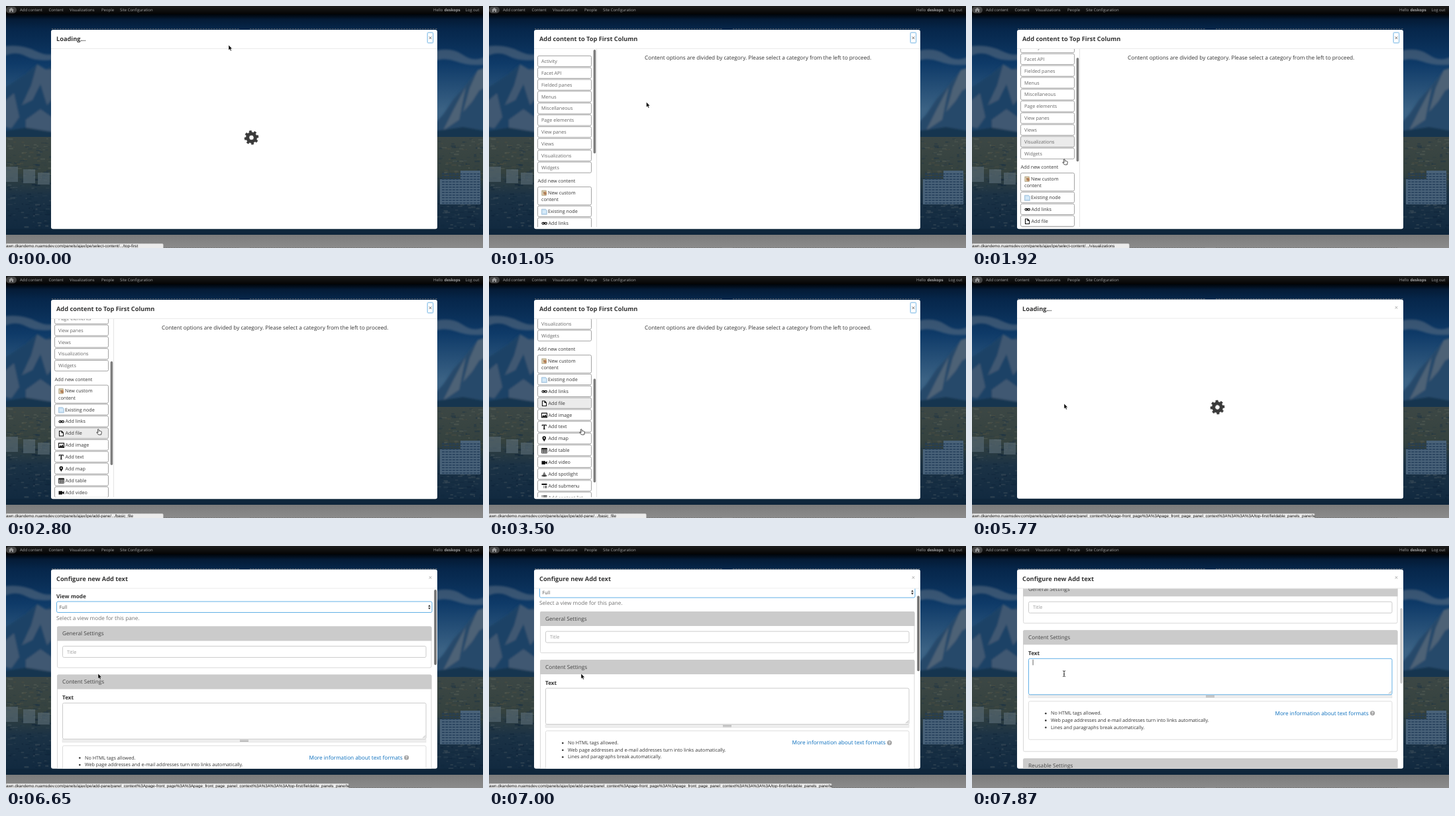
These frames come from a looping animation (720x366 px, 8000 ms). An HTML page:

```html
<!DOCTYPE html>
<html lang="en">
<head>
<meta charset="utf-8">
<title>Adding a text pane</title>
<style>
html, body { margin: 0; width: 100%; height: 100%; overflow: hidden; background: #000; }
#stage { display: block; width: 720px; height: 366px; }
text { font-family: "Open Sans", sans-serif; text-rendering: geometricPrecision; white-space: pre; }
.ui { font-family: "Liberation Sans", Arial, sans-serif; }
</style>
</head>
<body>
<svg id="stage" viewBox="0 0 720 366"></svg>
<script>
const STEP = 175, LOOP = 8000;
const SMALL = 7.19, BODY = 8.215, HEAD = 9.24;
const stage = document.getElementById('stage');
const $ = id => document.getElementById(id);

const text = (x, mid, size, str, fill = '#333', more = '') =>
  `<text x="${x}" y="${mid + size * .36}" font-size="${size}" fill="${fill}" ${more}>${str}</text>`;
const rect = (x, y, w, h, fill, more = '') =>
  `<rect x="${x}" y="${y}" width="${w}" height="${h}" fill="${fill}" ${more}/>`;
const path = (d, fill, more = '') => `<path d="${d}" fill="${fill}" ${more}/>`;
const fade = (id, ...stops) => `<linearGradient id="${id}" x2="0" y2="1">` +
  stops.map(([o, c]) => `<stop offset="${o}" stop-color="${c}"/>`).join('') + '</linearGradient>';
const bold = 'font-weight="700"';

// Backdrop: sky, hills and a speckled city
let seed = 7;
const rnd = () => (seed = seed * 16807 % 2147483647) / 2147483647;
function specks(x0, x1, y0, y1, n, tones) {
  let out = '';
  for (let i = 0; i < n; i++)
    out += rect((x0 + rnd() * (x1 - x0)).toFixed(1), (y0 + rnd() * (y1 - y0)).toFixed(1), (2 + rnd() * 6).toFixed(1),
      (.8 + rnd() * 1.8).toFixed(1), tones[Math.floor(rnd() * tones.length)], 'opacity=".5"');
  return out;
}
function backdrop() {
  const far = ['#596058', '#2c3d45', '#4c4f42', '#1f3444'], near = ['#0c2136', '#2c4353', '#10283c', '#42535c'];
  let windows = '';
  for (let y = 254; y < 300; y += 4) windows += `M658 ${y}H717`;
  return rect(0, 0, 720, 347, 'url(#sky)') +
    '<g filter="url(#soft)">' +
    path('M-9 62Q20 56 45 68T80 66V80Q50 86 30 76T-9 80ZM640 70Q670 60 690 74T730 72V88Q700 92 680 84T640 86Z', '#6f7d8a', 'opacity=".45"') +
    path('M-9 128L10 116 28 104 47 88 60 96 80 84V210H-9Z', '#1f4266') +
    path('M47 88L38 120 24 150 40 142 52 118 62 150 80 128V96L60 96ZM-9 150L12 132 20 168 8 185-9 180ZM30 172L52 156 80 176V194L30 190Z', '#57697a', 'opacity=".6"') +
    path('M640 186L660 164 676 140 694 120 712 97 730 90V210H640Z', '#284a6b') +
    path('M712 97L700 124 690 160 704 144 714 128 730 120V92ZM694 122L676 156 660 188 684 172Z', '#66737e', 'opacity=".6"') +
    path('M-9 190L30 184 80 192V206H-9ZM640 190L690 183 730 190V206H640Z', '#18344f') + '</g>' +
    rect(0, 198, 720, 148, 'url(#town)') +
    specks(0, 66, 200, 262, 110, far) + specks(0, 66, 255, 336, 110, near) +
    specks(651, 718, 200, 262, 110, far) + specks(651, 718, 290, 336, 80, near) +
    path('M0 243H18V266H0ZM26 247H44V268H26ZM48 252H66V270H48Z', '#5b6d78', 'opacity=".6"') +
    path('M655 262H686V249H716V300H655Z', '#496279') +
    path(windows, 'none', 'stroke="#233e59" stroke-width="1.7" stroke-dasharray="4 1.3"') +
    rect(0, 337, 720, 9, '#0f263b') + rect(0, 346, 720, 20, 'url(#band)') +
    path('M69 34.5H352M368 34.5H651M77 365.5H352M368 365.5H642', 'none',
      'stroke="#777" stroke-width=".8" stroke-dasharray="2.5 1.5"');
}
function topBar() {
  const menu = [[21, 'Add content'], [64.5, 'Content'], [96, 'Visualizations'], [144, 'People'], [172, 'Site Configuration'], [645, 'Hello']];
  return rect(0, 0, 720, 20, 'url(#shade)') + rect(0, 0, 720, 12, 'url(#bar)') +
    rect(0, 1, 16, 10, '#444', 'rx="5"') +
    path('M8 2.5L12 6H11V9H9V7H7V9H5V6H4Z', '#999') +
    menu.map(([x, s]) => text(x, 6.3, 5.95, s, '#a2a2a2')).join('') +
    text(661.5, 6.3, 5.95, 'deskops', '#a2a2a2', bold) + text(693.5, 6.3, 5.95, 'Log out', '#a2a2a2');
}

// Pane list
const cats = ['Activity', 'Facet API', 'Fielded panes', 'Menus', 'Miscellaneous', 'Page elements', 'View panes', 'Views', 'Visualizations', 'Widgets'];
const adds = ['Existing node', 'Add links', 'Add file', 'Add image', 'Add text', 'Add map', 'Add table', 'Add video', 'Add spotlight', 'Add submenu', 'Add content list', 'Add content item'];
const line = 'stroke="#111" stroke-width="1.1"';
const icons = [
  path('M.5 .5H6.5L8.3 2.5V8.5H.5Z', '#c3dff4', 'stroke="#86abc9" stroke-width=".6"') + path('M2 3.5H7M2 5.5H7', 'none', 'stroke="#e9f4fb"'),
  path('M1 4a1.3 1.3 0 0 1 1.3-1.3h1a1.3 1.3 0 0 1 0 2.8h-1A1.3 1.3 0 0 1 1 4ZM5 4a1.3 1.3 0 0 1 1.3-1.3h.8a1.3 1.3 0 0 1 0 2.8h-.8A1.3 1.3 0 0 1 5 4ZM3 4H6', 'none', line),
  path('M1.5 .5H5L7.5 3V8H1.5ZM5 .5V3H7.5', '#fff', line),
  path('M.5 1H8.5V7.5H.5Z', '#fff', line) + path('M1 7L3 4 4.5 5.5 6.5 3 8 7Z', '#111'),
  path('M.8 .5H7.8V2.7H7L6.5 1.6H5.1V6.8L6.2 7.7H2.4L3.5 6.8V1.6H2.1L1.6 2.7H.8Z', '#111'),
  path('M4.3 8.5C3 6 1.5 4.5 1.5 3A2.8 2.8 0 0 1 7.1 3C7.1 4.5 5.6 6 4.3 8.5ZM4.3 2a1 1 0 1 0 .1 0Z', '#111', 'fill-rule="evenodd"'),
  path('M.6 .8H8.4V8H.6ZM.6 3.6H8.4M.6 5.8H8.4M3.2 2V8M5.8 2V8', '#fff', 'stroke="#111" stroke-width=".8"') + rect(.4, .5, 8.2, 1.8, '#111'),
  path('M.5 2H6V4L8.7 2.2V7L6 5.2V7.2H.5Z', '#111'),
  path('M4.4 .5L7 5.5H1.8Z', '#777') + path('M.5 6Q4.5 4.6 8.3 6V7.2Q4.5 8.4 .5 7.2Z', '#333'),
  path('M.5 .5H8.5V2.5H.5ZM3 4H4V5H3ZM5 4H8.5V5H5ZM3 6H4V7H3ZM5 6H8.5V7H5Z', '#111'),
  path('M.5 .7h1.2v1.2H.5ZM2.6 .7h6v1.2h-6ZM.5 2.8h1.2V4H.5ZM2.6 2.8h6V4h-6ZM.5 4.9h1.2v1.2H.5ZM2.6 4.9h6v1.2h-6ZM.5 7h1.2v1.2H.5ZM2.6 7h6v1.2h-6Z', '#111'),
  path('M.7 .8H8.3V7.8H.7Z', '#777', line) + path('M1 2.2H8M2 4.2H7M2 6H7', 'none', 'stroke="#111" stroke-width=".8"')
];
const PITCH = 17.85;
const button = (mid, h, id) => rect(73.5, mid - h / 2, 81, h, '#fff', `id="${id}" rx="2" stroke="#989898" stroke-width=".9"`);
function list() {
  let out = cats.map((s, i) => {
    const y = 83.5 + PITCH * i;
    return button(y, 16.2, s) + text(79, y, SMALL, s, '#666');
  }).join('');
  out += text(73.5, 264.5, SMALL, 'Add new content') + button(287.2, 27.2, 'custom') +
    path('M79.8 279h6.5v7.4h-6.5Z', '#e0d3b4', 'stroke="#94835f" stroke-width=".6"') +
    '<circle cx="84.6" cy="283.3" r="2.5" fill="#c58a5c"/>' + path('M81.5 281L86.5 285', 'none', 'stroke="#6b6b6b" stroke-width=".8"') +
    text(89, 282, SMALL, 'New custom') + text(79, 292.5, SMALL, 'content');
  return out + adds.map((s, i) => {
    const y = 310.5 + PITCH * i;
    return button(y, 16.2, s) + `<g transform="translate(79 ${y - 3.7})">${icons[i]}</g>` + text(i ? 89.5 : 89, y, SMALL, s);
  }).join('');
}

// Settings form
function fieldset(y, h, name) {
  return rect(77.5, y, 564.5, h, '#fff', 'rx="2" stroke="#d8d8d8"') +
    path(`M77 ${y + 21.5}V${y + 1.5}Q77 ${y - .5} 79 ${y - .5}H640.5Q642.5 ${y - .5} 642.5 ${y + 1.5}V${y + 21.5}Z`, '#cbcbcb') +
    text(85, y + 10.5, BODY, name, '#444');
}
function form() {
  const rules = ['No HTML tags allowed.', 'Web page addresses and e-mail addresses turn into links automatically.', 'Lines and paragraphs break automatically.'];
  return text(76, 76.2, BODY, 'View mode', '#333', bold) +
    rect(76.5, 84.5, 566.5, 16.5, '#fff', 'id="select" rx="2"') + text(80.5, 93, SMALL, 'Full', '#555') +
    path('M637.2 92.2L639 89.3 640.8 92.2ZM637.2 93.7L639 96.6 640.8 93.7Z', '#333') +
    text(76, 109.3, BODY, 'Select a view mode for this pane.', '#737373') +
    fieldset(122.5, 62, 'General Settings') +
    rect(85.5, 152, 548.5, 17, '#fff', 'rx="2" stroke="#ccc"') + text(92, 160.5, SMALL, 'Title', '#999') +
    fieldset(195.5, 183, 'Content Settings') + text(85, 230, BODY, 'Text', '#333', bold) +
    rect(85, 293, 549, 4.5, '#eee', 'stroke="#ddd" stroke-width=".5"') +
    path('M353 294.3H366M353 296H366', 'none', 'stroke="#999" stroke-width=".8"') +
    rect(85.5, 238, 548.5, 54.5, '#fff', 'id="area" rx="2"') +
    path('M629 291L633 287M631 291L633 289', 'none', 'stroke="#888" stroke-width=".6"') +
    rect(91.7, 239.5, .7, 8.5, '#222', 'id="caret"') +
    rect(85.5, 302.5, 548.5, 58, '#fff', 'rx="2" stroke="#ddd"') +
    rules.map((s, i) => `<circle cx="111.3" cy="${321 + i * 10.6}" r="1.3" fill="#333"/>` + text(119, 320.6 + i * 10.6, SMALL, s)).join('') +
    text(457.5, 320.4, BODY, 'More information about text formats', '#0a6ebd') +
    '<circle cx="604.5" cy="320.5" r="3.6" fill="#a5a5a5"/>' + text(602.9, 320.6, 6, '?', '#fff', bold) +
    fieldset(389.5, 60, 'Reusable Settings');
}

function gear() {
  const teeth = [[-13, 8.2], [-9, 10.6], [9, 10.6], [13, 8.2]];
  let d = '';
  for (let turn = 0; turn < 360; turn += 45)
    for (const [deg, r] of teeth) {
      const a = (turn + deg) * Math.PI / 180;
      d += `${d ? 'L' : 'M'}${(r * Math.cos(a)).toFixed(2)} ${(r * Math.sin(a)).toFixed(2)}`;
    }
  return path(d + 'ZM3.5 0A3.5 3.5 0 1 0 -3.5 0A3.5 3.5 0 1 0 3.5 0Z', '#3a3a3a',
    'id="gear" fill-rule="evenodd" stroke="#3a3a3a" stroke-width=".5" stroke-linejoin="round"');
}
const ink = 'stroke="#000" stroke-width=".7" stroke-linejoin="round"';
const cursors =
  path('M0 0V7.8L1.8 6.2 3 9 4.4 8.4 3.2 5.7H5.5Z', '#000', 'id="arrow" stroke="#fff" stroke-width=".5"') +
  path('M-.6 .6Q.3-.5 1 .6L1.6 3 Q2.6 2.3 3 3.2Q4 2.6 4.3 3.6Q5.5 3.4 5.3 4.8L4.6 8.5H.6L-2 5.4Q-2.2 4.2-1 4.5L.1 5.3Z', '#fff', 'id="hand" ' + ink) +
  path('M-2-4.2Q0-4.2 0-3Q0-4.2 2-4.2M0-3V3.3M-1 .8H1M-2 4.4Q0 4.4 0 3.3Q0 4.4 2 4.4', 'none', 'id="beam" stroke="#222" stroke-width=".9"');

stage.innerHTML = '<defs>' +
  fade('sky', [0, '#020c1a'], [.1, '#06264a'], [.25, '#0e3a68'], [.45, '#3b6284']) +
  fade('town', [0, '#3c4745'], [.35, '#35423f'], [.6, '#1b3245'], [1, '#10283f']) +
  fade('band', [0, '#7c7c7c'], [1, '#8b8b8b']) + fade('bar', [0, '#1d1d1d'], [1, '#050505']) +
  '<linearGradient id="shade" x2="0" y2="1"><stop offset=".5"/><stop offset="1" stop-opacity="0"/></linearGradient>' +
  '<filter id="soft"><feGaussianBlur stdDeviation="1.6"/></filter>' +
  '<clipPath id="listClip"><rect x="68" y="65" width="100" height="269.5"/></clipPath>' +
  '<clipPath id="formClip"><rect x="68" y="65" width="583" height="272"/></clipPath></defs>' +
  backdrop() + topBar() +
  '<g id="modal">' + rect(68, 36, 583, 301.3, '#fff', 'rx="3"') +
  text(76, 50.1, HEAD, '', '#333', 'id="title" ' + bold) +
  path('M68 64.5H651', 'none', 'stroke="#e5e5e5" stroke-width=".8"') +
  '<g id="ring">' + rect(636, 40, 8.8, 16, '#fff', 'rx="2" stroke="#cfe6f7" stroke-width="2"') +
  rect(636.4, 40.4, 8, 15.2, '#fff', 'rx="1.5" stroke="#86bfe6" stroke-width=".8"') + '</g>' +
  path('M638.8 46.4L642.2 50M642.2 46.4L638.8 50', 'none', 'id="close" stroke-width="1"') +
  '<g id="loading"><g transform="translate(370.5 199)">' + gear() + '</g></g>' +
  '<g id="picker"><g clip-path="url(#listClip)"><g id="list">' + list() + '</g></g>' +
  path('M162.5 65V334.5', 'none', 'stroke="#ddd" stroke-width=".8"') +
  rect(157.6, 66, 3.6, 157, '#7d7d7d', 'id="listThumb" rx="1.8"') +
  text(235, 77.7, BODY, 'Content options are divided by category. Please select a category from the left to proceed.') + '</g>' +
  '<g id="settings" clip-path="url(#formClip)"><g id="form">' + form() + '</g>' +
  rect(646.2, 66.5, 3.8, 114, '#777', 'id="formThumb" rx="1.9"') + '</g></g>' +
  '<g id="tip">' + rect(138, 227.3, 33.5, 10.4, '#ececec', 'stroke="#bdbdbd" stroke-width=".6"') +
  text(141.5, 232.5, 6.15, 'Add table', '#222', 'class="ui"') + '</g>' +
  '<svg id="status" y="359" height="7">' +
  '<rect x="-3" y=".3" width="100%" height="12" rx="2" fill="#ebebeb" stroke="#aaa" stroke-width=".5" transform="translate(2.5 0)"/>' +
  text(0, 4, 6.24, '', '#111', 'id="url" class="ui"') + '</svg>' +
  '<g id="cursor">' + cursors + '</g>';

// Linear track through [step, value] points
function track(k, ...pts) {
  if (k <= pts[0][0]) return pts[0][1];
  for (let i = 1; i < pts.length; i++) {
    const [a, u] = pts[i - 1], [b, v] = pts[i];
    if (k <= b) return u + (v - u) * (k - a) / (b - a);
  }
  return pts[pts.length - 1][1];
}
// Latest value whose start step has been reached
const pick = (k, ...pts) => pts.filter(p => p[0] <= k).pop()[1];
const show = (id, on) => $(id).setAttribute('visibility', on ? 'visible' : 'hidden');
const move = (id, x, y) => $(id).setAttribute('transform', `translate(${x} ${y})`);
const focusBox = (id, on) => $(id).setAttribute('stroke', on ? '#62b0e6' : '#ccc');

const host = 'awn.dkandemo.nuamsdev.com/panels/ajax/ipe/';
const context = host + 'add-pane/panel_context%3Apage-front_page%3A%3Apage_front_page_panel_context%3A%3A%3A%3A/top-first/fieldable_panels_pane/';
let lit;

function draw(k) {
  const page = pick(k, [0, 'loading'], [4, 'picker'], [30, 'loading'], [34, 'settings']);
  for (const p of ['loading', 'picker', 'settings']) $(p).style.display = p === page ? '' : 'none';
  $('title').textContent = { loading: 'Loading...', picker: 'Add content to Top First Column', settings: 'Configure new Add text' }[page];
  move('modal', 0, k < 22 ? 0 : -.5);
  show('ring', k < 30);
  $('close').setAttribute('stroke', k < 30 ? '#666' : '#aaa');
  $('gear').setAttribute('transform', `rotate(${k * 31.5 - 10})`);

  const scroll = track(k, [10, 0], [11, 21], [14, 108.5], [17, 108.5], [20, 154], [22, 190]);
  move('list', 0, -scroll);
  move('listThumb', 0, scroll * .58);
  const hover = pick(k, [0, ''], [9, 'Visualizations'], [14, 'Add file'], [22, 'Add table'], [26, 'Add map'], [27, 'Add text']);
  if (lit) lit.setAttribute('fill', '#fff');
  lit = hover && $(hover);
  if (lit) lit.setAttribute('fill', '#ebebeb');
  show('tip', k >= 24 && k < 28);

  const down = track(k, [39, 0], [42, 67.2]), typing = k >= 43;
  move('form', 0, -down);
  move('formThumb', 0, down * .417);
  $('formThumb').setAttribute('opacity', track(k, [43, 1], [45, .35]));
  focusBox('select', !typing);
  focusBox('area', typing);
  show('caret', typing);

  show('status', k < 5 || k >= 8 && k < 43);
  $('status').setAttribute('width', track(k, [24, 238], [26, 375.5], [28, 518]));
  $('url').textContent = pick(k, [0, host + 'select-content/.../top-first'], [8, host + 'select-content/.../visualizations'],
    [14, host + 'add-pane/.../basic_file'], [22, context + 'table'], [26, context + 'map'], [27, context + 'text']);

  move('cursor', track(k, [4, 336], [8, 139]), track(k, [4, 59], [8, 231.5], [24, 231.5], [26, 208.5], [28, 193]));
  const shape = pick(k, [0, 'arrow'], [8, 'hand'], [30, 'arrow'], [42, 'beam']);
  for (const c of ['arrow', 'hand', 'beam']) show(c, c === shape);
}

let start, last = -1;
function tick(now) {
  start ??= now;
  const k = Math.floor(((now - start) % LOOP + 5) / STEP);
  if (k !== last) draw(Math.min(last = k, 45));
  requestAnimationFrame(tick);
}
draw(0);
requestAnimationFrame(tick);
</script>
</body>
</html>
```
